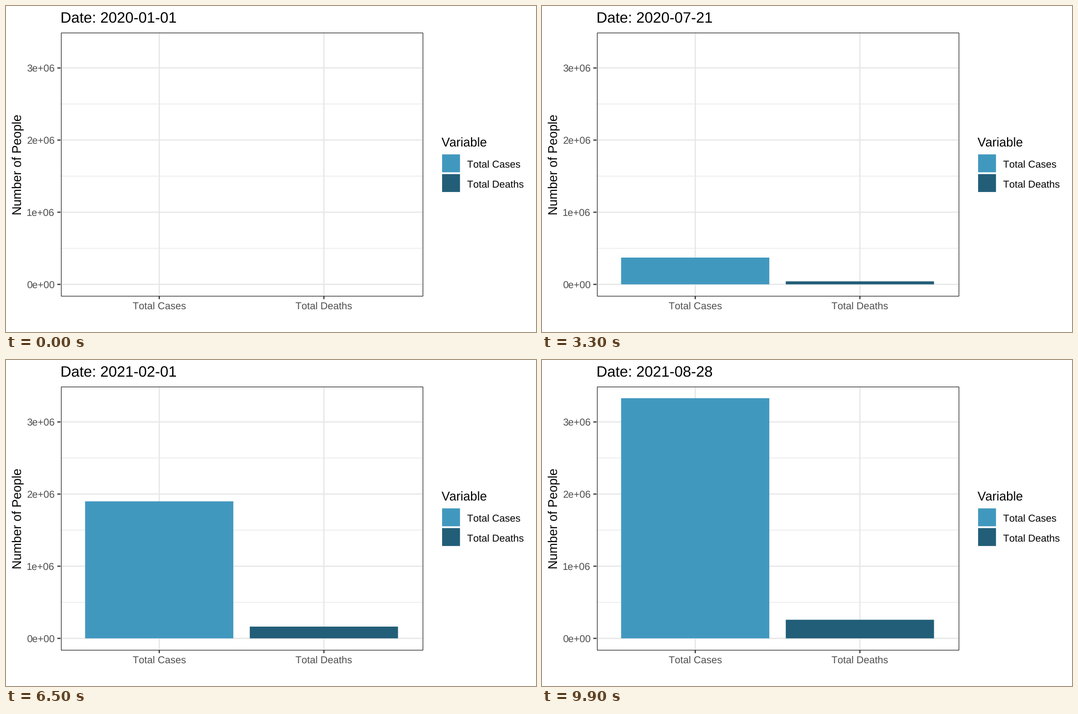
A matplotlib script for the animation above (10000 ms loop, 954x587 px).

```python
import matplotlib.pyplot as plt
import numpy as np
from matplotlib.animation import FuncAnimation
from matplotlib.patches import Rectangle

W, H, DPI = 954, 587, 64
PT = 72 / DPI                      # points per pixel
FRAMES, INTERVAL = 100, 100
START, DAYS = np.datetime64("2020-01-01"), 605

LEFT, RIGHT, TOP, BOTTOM = 98, 749.7, 47.6, 522.2
ZERO, MILLION = 501.2, 129.9       # y of zero, pixels per million
CENTERS, BAR_W = (275.8, 572.2), 266.8
NAMES = ("Total Cases", "Total Deaths")
FILLS = ("#4198BE", "#225E78")
GRID, DARK, GREY = "#E6E6E6", "#333333", "#4D4D4D"

# day, thousands of cases, thousands of deaths
CURVE = np.array([
    (70, 0, 0), (90, 1.2, 0), (105, 5.8, 0.4), (120, 19.2, 1.9),
    (135, 45, 4.8), (151, 90.7, 9.9), (166, 150.3, 17.6),
    (181, 226.1, 27.8), (196, 317.6, 36.9), (212, 424.6, 46.7),
    (227, 517.7, 56.5), (243, 599.6, 64.4), (258, 676.5, 71.7),
    (277, 761.7, 79.1), (278, 789.8, 81.9), (288, 834.9, 85.3),
    (304, 925, 91.8), (319, 1006.5, 98.5), (334, 1113.5, 105.9),
    (349, 1267.2, 115.1), (363, 1401.5, 123.8), (380, 1609.7, 139),
    (396, 1864.3, 158.5), (411, 1995.9, 174.7), (424, 2086.9, 185.7),
    (443, 2187.9, 197.2), (455, 2238.9, 203.2), (470, 2295.4, 211.2),
    (485, 2344.8, 216.9), (500, 2380.7, 220.4), (516, 2413.7, 223.5),
    (518, 2420.7, 227.8), (531, 2459.6, 230.4), (546, 2519.3, 233),
    (561, 2629.6, 235.7), (577, 2848.3, 240.9), (592, 3101.3, 248.4),
    (605, 3328.9, 257.9),
])

plt.rcParams.update({
    "font.family": "Liberation Sans",
    "text.hinting": "no_hinting",
    "text.kerning_factor": 20,     # plain advance widths
    "toolbar": "None",
})

fig = plt.figure(figsize=(W / DPI, H / DPI), dpi=DPI, facecolor="white")
ax = fig.add_axes((0, 0, 1, 1))
ax.set(xlim=(0, W), ylim=(H, 0))
ax.axis("off")


def box(x, y, w, h, color, z=1):
    patch = Rectangle((x, y), w, h, fc=color, lw=0, zorder=z, snap=False)
    return ax.add_patch(patch)


def label(x, y, s, size, color="black", **kw):
    return ax.text(x, y, s, size=size * PT, color=color, va="baseline", **kw)


def hline(y, width):
    box(LEFT, y - width / 2, RIGHT - LEFT, width, GRID)


# grid, ticks and axis labels
for half in (0.5, 1.5, 2.5):
    hline(ZERO - half * MILLION, 1.1)
for n in range(4):
    y = ZERO - n * MILLION
    hline(y, 2.1)
    box(LEFT - 5.6, y - 1, 5.6, 2.1, DARK)
    label(87.5, y + 6.8, f"{n}e+0{6 if n else 0}", 17.95, GREY, ha="right")
for x, name in zip(CENTERS, NAMES):
    box(x - 1, TOP, 2.1, BOTTOM - TOP, GRID)
    box(x - 1, BOTTOM, 2.1, 5.6, DARK)
    label(x, 546, name, 17.95, GREY, ha="center")
ax.add_patch(Rectangle((LEFT + 0.5, TOP), RIGHT - LEFT - 0.5, BOTTOM - TOP,
                       fill=False, ec=DARK, lw=1.2 * PT, zorder=4))
label(28, 285.5, "Number of People", 22.5, ha="center",
      rotation=90, rotation_mode="anchor")

# legend
label(784, 253, "Variable", 22.5)
for y, name, fill in zip((267.2, 302.7), NAMES, FILLS):
    box(785, y, 32.2, 32.2, fill)
    label(829.5, y + 23.8, name, 17.95)

title = label(97.5, 30.6, "", 26.9)
bars = [box(x - BAR_W / 2, ZERO, BAR_W, 0, fill, 3)
        for x, fill in zip(CENTERS, FILLS)]


def update(i):
    step = DAYS / (FRAMES - 1)
    title.set_text(f"Date: {START + np.timedelta64(round(i * step), 'D')}")
    # each bar shows the last day that falls into the step
    day = min(int((i + 0.5) * step), DAYS)
    for bar, column in zip(bars, (1, 2)):
        thousands = np.interp(day, CURVE[:, 0], CURVE[:, column])
        bar.set_height(-thousands / 1000 * MILLION)
    return [title, *bars]


anim = FuncAnimation(fig, update, frames=FRAMES, interval=INTERVAL,
                     repeat=True, repeat_delay=0, blit=False)
plt.show()
```
